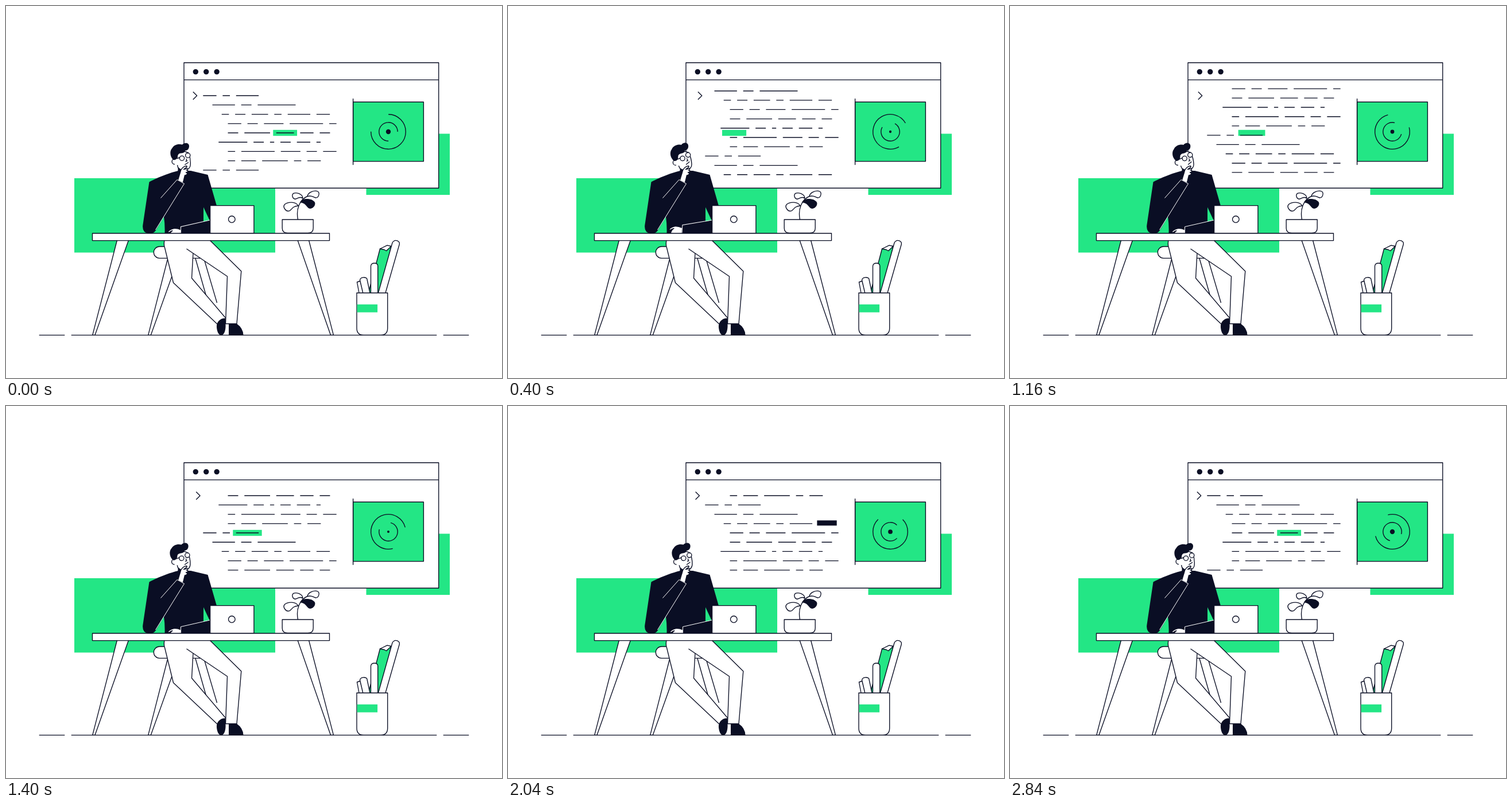
Recreate the animation shown at these times as an HTML page. Size 864 by 648 pixels, loop 2.88 s.

```html
<!DOCTYPE html>
<html lang="en">
<head>
<meta charset="utf-8">
<title>Thinking at the desk</title>
<style>
  html, body { margin: 0; width: 100%; height: 100%; overflow: hidden; background: #fff; }
  svg { display: block; width: 864px; height: 648px; }
  .g { fill: #23e685; }
  .d { fill: #0a0e24; }
  .w { fill: #fff; }
  .n { fill: none; }
  .s { stroke: #0a0e24; stroke-width: 1.35; stroke-linejoin: round; }
  .t { stroke: #fff; stroke-width: 1; fill: none; }
</style>
</head>
<body>
<svg viewBox="0 0 864 648">
  <defs>
    <clipPath id="page"><rect x="320" y="143" width="270" height="152.5"/></clipPath>
    <path id="leaf" vector-effect="non-scaling-stroke" d="M0 0C1 -7 12 -11 18 -8.500C22 -6 20 3 14 2.500C9 1 8 -2 0 0Z"/>
  </defs>

  <!-- window -->
  <rect class="g" x="119" y="300" width="350" height="129.5"/>
  <rect class="g" x="627.5" y="222.5" width="145.5" height="106.5"/>
  <rect class="w s" x="310" y="98.7" width="443.7" height="218.5"/>
  <path class="s" d="M310 128.6H753.7"/>
  <path stroke="#0a0e24" stroke-width="9.4" stroke-linecap="round" d="M330.3 114.6h.01m18.4 0h.01m18.4 0h.01"/>
  <path id="prompt" class="n s" d="M325.8 149.5l6.8 6.7l-6.8 6.7"/>
  <rect id="mark"/>
  <path id="code" class="n s" clip-path="url(#page)"/>
  <path id="whiteLine" class="t" d="M541 221H564"/>

  <!-- spinner panel -->
  <rect class="g s" x="604.6" y="167.2" width="122.8" height="103.4"/>
  <path class="s" d="M604.6 161.3V276.8"/>
  <g transform="translate(666 219)">
    <path id="outer" class="n s" d="M0 -30.3A30.3 30.3 0 1 1 -30.3 0"/>
    <path id="inner" class="n s" d="M0 16.2A16.2 16.2 0 1 1 16.2 0"/>
    <circle id="dot" class="d"/>
  </g>

  <!-- stool and table legs -->
  <g class="w s">
    <path d="M282 439L247.7 573.3H252.3L290 468"/>
    <path class="n" d="M327.5 431L349.5 508M344.5 439L367.5 517"/>
    <path d="M341 439.3H267.5A10 10 0 0 1 267.5 419H330"/>
    <path d="M193.5 408L150.7 573.3H155L213.5 408Z"/>
    <path d="M508 408L565.5 573.3H570.5L527.5 408Z"/>
  </g>

  <!-- legs -->
  <path class="w s" d="M276 408Q274.5 416 276.500 421L291.5 482L369 555L383 544L323.5 474L326 430"/>
  <path class="w" d="M277 408H355L320 427L300 440L278 421Z"/>
  <path class="w s" d="M355 408L409.800 462L402 553.5H382.5L385.5 471L314.5 423"/>
  <path class="d" d="M382 544C375 543 366 549 367 560C368 569 371 573.5 375 573.5C381 573 383 563 382.5 554Z"/>
  <path class="d" d="M388 553.5H402Q413 561 413.5 573.5H388Z"/>

  <!-- body -->
  <path class="d" d="M249.5 306.5C268 297 284 291 300 287H322L351.5 294L367 348H356V396H276.500Q277 380 275 367L261.5 390Q257 397.5 248.5 396.5Q237 395 238.3 382Z"/>
  <path class="g" d="M344 350.5L354.5 373L344 375.5Z"/>
  <path class="d" d="M299.5 277H310V292H299.5Z"/>
  <path class="t" d="M269.5 334.5L298 302.500L310.5 309.5L260.5 390"/>

  <g id="head">
    <path class="w s" d="M298 258Q296 270 299.5 281Q304 287 313 286Q320.5 284 321.2 277Q322 266 318 256L308 252Z"/>
    <circle class="w s" cx="293.7" cy="271" r="4.6"/>
    <path class="w" d="M294 266H300V277H294Z"/>
    <path class="d" d="M291.5 268C285 262 285 252 289.5 247.5C293 241 301 239.500 307 241.5C311 237 319 238 319 244C319 249 316 252 312 252Q312 256 304 256.5Q299 257 299 263Q297 269 291.5 268Z"/>
    <g class="w s" stroke-linecap="round">
      <circle cx="306.5" cy="265.2" r="4.1"/><circle cx="316.7" cy="260.2" r="4.1"/>
      <path class="n" d="M302.5 264L298 265.500M314 266.5L315.3 270L313 270.5M311.800 276.300L317.5 272.5"/>
    </g>
  </g>

  <!-- hand on chin -->
  <path class="w s" d="M299.5 303L303.5 290C304 284 309 279 314.5 278.5Q316.5 279.5 313 282L309.5 284.5L316 283Q318 284.5 314.5 286L317 287Q317 289.5 313.5 290L316 291Q315.5 294 311.5 295L308.5 307.5"/>

  <!-- typing arm, its lower edge hidden by the table -->
  <g id="arm">
    <path class="w s" d="M304.5 389.5Q298 387 292 387.5Q285 389 281.5 394Q283.5 395.5 287 392.5L290 391.5Q285.5 394 284.5 402H304.5Z"/>
    <path class="t" d="M304.5 402V384.5L355 373"/>
  </g>

  <!-- laptop, plant, table top -->
  <rect class="w s" x="355.6" y="347.6" width="76.3" height="48.5"/>
  <circle class="w s" cx="393.3" cy="371.5" r="5.8"/>
  <path class="w s" d="M481.2 372H535.2V387Q535.2 395.5 526 395.5H490.5Q481.2 395.5 481.2 387Z"/>
  <path class="n s" d="M508.5 372C505 354 511 337 526 331M517 335.5L513 332"/>
  <g class="w s">
    <use href="#leaf" transform="translate(525 331.500)"/>
    <use href="#leaf" transform="translate(517 334) scale(-.9 .9)"/>
    <use href="#leaf" transform="translate(509 348) scale(-1.2 1.2) rotate(20)"/>
    <use href="#leaf" class="d" transform="translate(513 341.500) scale(1.2) rotate(25)"/>
  </g>
  <rect class="w s" x="150.5" y="396" width="413" height="12.6"/>

  <!-- pen cup -->
  <g class="w s">
    <path class="g" d="M630 505L651.5 423L671 418.5L652 505Z"/>
    <path d="M651.5 423L664 416.800L671 418.5L662.5 426.5L659 424.5Z"/>
    <path d="M647 505L673 412.5Q676 407 681.5 408.800Q686 410.5 685.3 415L659.500 505Z"/>
    <path d="M635.5 505V453Q636 448 641.7 448Q647.7 448 647.7 453V505Z"/>
    <path d="M616 505L611.5 481L617 479L624 505Z"/>
    <path d="M623 505L616.5 477.5Q617 473.5 622 472.800Q627 472.300 628.7 475L635 505Z"/>
    <path d="M611 499.7H664.7V561Q664.7 573.3 652.5 573.3H623Q611 573.3 611 561Z"/>
  </g>
  <rect class="g" x="611.6" y="519.8" width="35.5" height="13.8"/>
  <path class="s" d="M57.7 573.3H102.3M113.7 573.3H750.3M761.7 573.3H806.3"/>
</svg>

<script>
const LOOP = 2880, SPIN = 960, MOVE = 240;
const LEFT = 343.3, TOP = 156.2, PITCH = 16.2, CHAR = 5.35, GAP = 10.8, PAD = 5.5;
const MIDDLE = 4; // the row that carries the marker
const $ = id => document.getElementById(id);
const set = (id, attributes) => {
  for (const name in attributes) $(id).setAttribute(name, attributes[name]);
};

// indent : letters in each word
const rows = ['0: 4 2 7', '3: 7 3 12', '6: 2 3 5 2 7 4', '8: 4 3 6 10.5 2',
  '8: 3 8 5.4 4 3', '5: 9 3 1 3 4 1', '8: 2 10.5 6 3 4', '8: 2 4.4 8 2 4'].map(layOut);

function layOut(line) {
  const [indent, words] = line.split(':');
  let x = LEFT + indent * CHAR * 1.01;
  return words.trim().split(' ').map(letters => {
    const word = { x, width: 1.9 + letters * CHAR };
    x += word.width + GAP;
    return word;
  });
}

const rowAt = shift => rows[(MIDDLE + shift) % rows.length];
const ease = (t, from, to) => {
  const p = Math.min(1, Math.max(0, (t - from) / (to - from)));
  return p * p * (3 - 2 * p);
};

// scroll stops and the marked word at each; moves come in pairs
const stops = [[0, 2], [1, 0], [2, 0], [3, 1], [4, 2], [6, 5], [7], [8]];
const moveMiddle = i => 160 + 720 * Math.floor(i / 2) + 240 * (i % 2);

function drawCode(t) {
  let shift = 0, { x, width } = rowAt(0)[2];
  stops.slice(1).forEach(([stop, word], i) => {
    const middle = moveMiddle(i);
    const p = ease(t, middle - MOVE / 2, middle + MOVE / 2);
    shift += (stop - stops[i][0]) * p;
    const next = rowAt(stop)[word];
    if (next) {
      x += (next.x - x) * p;
      width += (next.width - width) * p;
    }
  });

  let path = '';
  for (let i = Math.floor(shift); i < shift + 10; i++) {
    const y = TOP + (i - shift) * PITCH;
    for (const word of rows[i % rows.length]) path += `M${word.x} ${y}h${word.width}`;
  }
  set('code', { d: path });

  // the dark marker leaves with its row, then the green one is back
  const dark = t >= 1600 && t < 2440;
  const carried = dark ? Math.max(0, shift - 6) : 0;
  if (t >= 2440) ({ x, width } = rowAt(0)[2]);
  const height = dark ? 9 : 10.4;
  set('mark', {
    x: x - PAD + 3 * carried,
    y: TOP + MIDDLE * PITCH - height / 2 - 17.2 * carried,
    width: width + 2 * PAD,
    height,
    class: dark ? 'd' : 'g'
  });
  $('whiteLine').style.display = dark && shift === 6 ? '' : 'none';
}

function draw(t) {
  drawCode(t);
  const turn = t / SPIN * 360;
  const pulse = (1 - Math.cos(t / SPIN * 2 * Math.PI)) / 2;
  set('outer', { transform: `rotate(${turn})` });
  set('inner', { transform: `rotate(${-turn})` });
  set('dot', { r: 4.2 - 2.2 * pulse });
  set('prompt', { transform: `translate(${5.5 * pulse})` });

  const tilt = -6.5 * ease(t, 40, 400) + 4.7 * ease(t, 1120, 1400) + 1.8 * ease(t, 2320, 2680);
  set('head', { transform: `rotate(${tilt} 308 287)` });
  const raise = t < 800 ? Math.sin(t / 800 * Math.PI) ** 2 : 0;
  set('arm', { transform: `rotate(${3.5 * raise} 355 373)` });
}

function frame(now) {
  draw(now % LOOP);
  requestAnimationFrame(frame);
}
draw(0);
requestAnimationFrame(frame);
</script>
</body>
</html>
```
